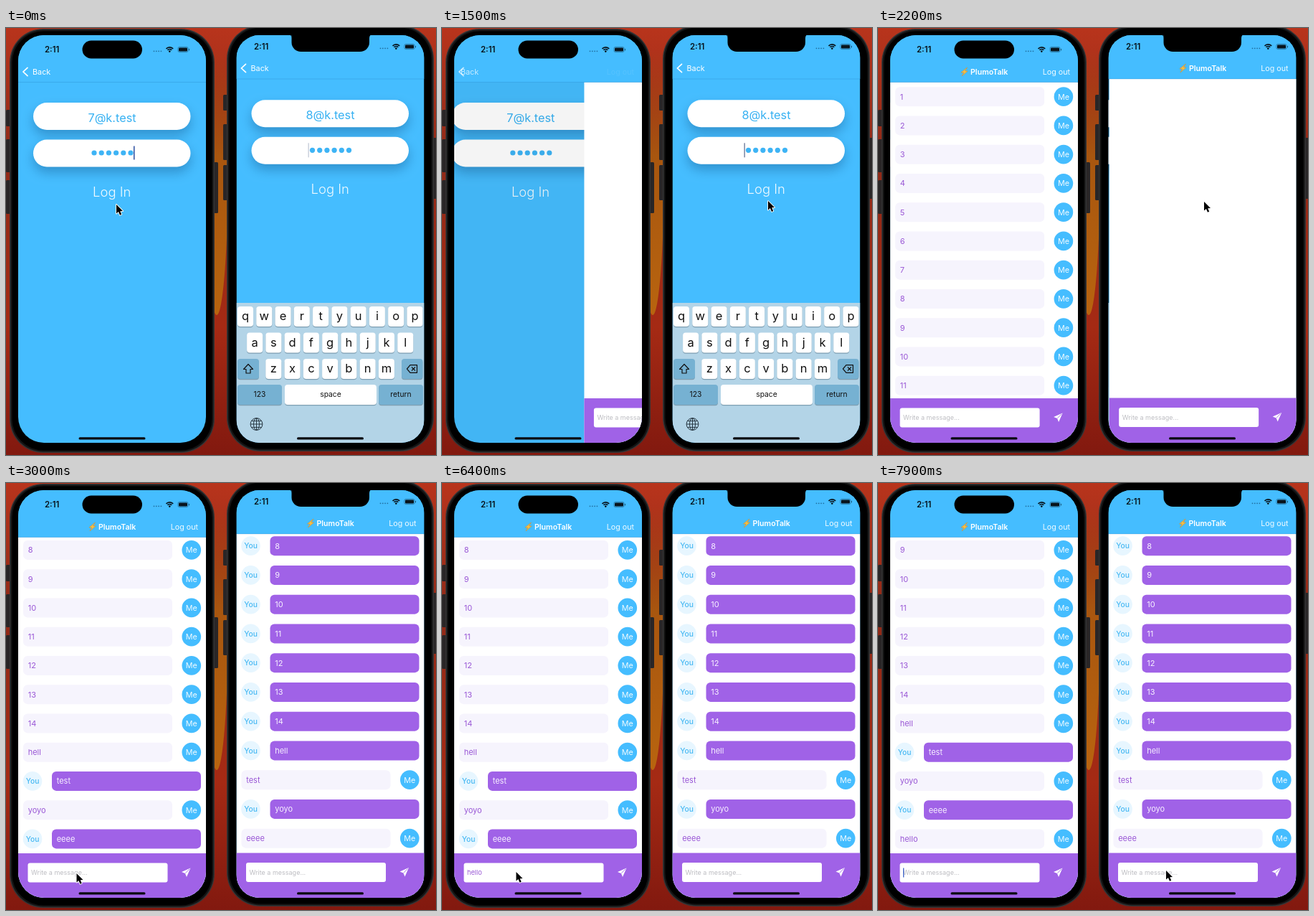
Animation of 600 by 595 pixels, one loop 8 s. Source, as an HTML page with a canvas:

```html
<!DOCTYPE html>
<html lang="en">
<head>
<meta charset="utf-8">
<title>Two phones chatting</title>
<style>
  html, body { margin: 0; width: 100%; height: 100%; overflow: hidden; background: #8c2416; }
  canvas { display: block; width: 600px; height: 595px; }
</style>
</head>
<body>
<canvas id="stage"></canvas>
<script>
const W = 600, H = 595, LOOP = 8000;
const BLUE = '#45bdff', PURPLE = '#a062e7', PALE = '#f6f4fd';
const SCREEN = { x: 17, y: 10, w: 262, h: 568 };
const SENT = 7450;
const TYPED = [5000, 5180, 5340, 5500, 5700];

const canvas = document.getElementById('stage');
const ctx = canvas.getContext('2d');
const dpr = window.devicePixelRatio || 1;
canvas.width = W * dpr;
canvas.height = H * dpr;

const messages = Array.from({ length: 14 }, (_, i) => ({ text: String(i + 1), from: 0 }));
messages.push(
  { text: 'hell', from: 0 }, { text: 'test', from: 1 }, { text: 'yoyo', from: 0 },
  { text: 'eeee', from: 1 }, { text: 'hello', from: 0 }
);

// Each phone is laid out in the left phone's coordinates, then moved by dx.
const phones = [
  {
    id: 0, dx: 0, email: '7@k.test', body: [5, 1, 286, 591], radius: 36,
    buttons: [[0, 114, 6, 23], [0, 155, 6, 46], [0, 212, 6, 47], [290, 187, 6, 71]],
    nav: 75.5, navY: 61, shift: 0, bar: 516, row: 40.25, clock: [54, 30], statusX: 0,
    push: 1415, load: 2080, scroll: 2210
  },
  {
    id: 1, dx: 304.5, email: '8@k.test', body: [3.5, -4, 289, 594], radius: 32,
    buttons: [[-1.5, 93, 6, 22], [-1.5, 134, 6, 50], [-1.5, 191, 6, 49], [291.5, 153, 6, 85]],
    nav: 71, navY: 56, shift: -3.7, bar: 515.5, row: 40.75, clock: [41.5, 26], statusX: 11.5,
    push: 1620, load: 2400, scroll: 2500
  }
];

const pointer = [
  [0, 154, 246], [450, 154, 246], [1300, 455, 241], [2350, 455, 242], [2900, 98.5, 544],
  [3300, 98.5, 544], [3800, 103.5, 542], [6500, 103.5, 542], [7000, 251, 541],
  [7500, 251, 541], [7860, 402, 540], [LOOP, 402, 540]
];

const clamp = v => Math.max(0, Math.min(1, v));
const smooth = v => { v = clamp(v); return v * v * (3 - 2 * v); };
const blink = phase => clamp(0.5 + 4 * Math.sin(2 * Math.PI * (phase + 0.02)));

function spring(ms) {
  if (ms <= 0) return 0;
  const k = ms * 0.013;
  return 1 - (1 + k) * Math.exp(-k);
}

function layer(draw, x = 0, y = 0, alpha = 1) {
  ctx.save();
  ctx.translate(x, y);
  ctx.globalAlpha *= alpha;
  draw();
  ctx.restore();
}

function rect(x, y, w, h, color) {
  ctx.fillStyle = color;
  ctx.fillRect(x, y, w, h);
}

function round(x, y, w, h, r, color) {
  ctx.beginPath();
  ctx.roundRect(x, y, w, h, r);
  ctx.fillStyle = color;
  ctx.fill();
}

function disc(x, y, r, color) {
  ctx.beginPath();
  ctx.arc(x, y, r, 0, 2 * Math.PI);
  ctx.fillStyle = color;
  ctx.fill();
}

function poly(points, closed = true) {
  ctx.beginPath();
  points.forEach(([x, y]) => ctx.lineTo(x, y));
  if (closed) ctx.closePath();
}

function stroke(color, width) {
  ctx.strokeStyle = color;
  ctx.lineWidth = width;
  ctx.stroke();
}

// y is the middle of the capitals
function text(str, x, y, size, color, weight = 400, align = 'left') {
  ctx.font = `${weight} ${size}px Inter, "Liberation Sans", sans-serif`;
  ctx.textAlign = align;
  ctx.fillStyle = color;
  ctx.fillText(str, x, y + size * 0.36);
}

function wallpaper() {
  const red = ctx.createLinearGradient(0, 0, 0, H);
  red.addColorStop(0, '#b8341c');
  red.addColorStop(0.3, '#8f2a18');
  red.addColorStop(0.7, '#a52a14');
  red.addColorStop(1, '#82190f');
  rect(0, 0, W, H, red);
  const glow = ctx.createLinearGradient(0, 30, 0, 400);
  glow.addColorStop(0, 'rgba(170,75,16,0)');
  glow.addColorStop(0.4, '#a8560f');
  glow.addColorStop(1, '#b8640f');
  ctx.beginPath();
  ctx.ellipse(294, 190, 16, 210, 0, 0, 2 * Math.PI);
  ctx.fillStyle = glow;
  ctx.fill();
}

function shell(p) {
  p.buttons.forEach(b => round(...b, 1.5, '#292627'));
  const [x, y, w, h] = p.body;
  round(x, y, w, h, 47, '#343435');
  round(x + 1.5, y + 1.5, w - 3, h - 3, 45.5, '#141414');
  round(x + 3.5, y + 3.5, w - 7, h - 7, 44, '#000');
}

function field(y) {
  ctx.save();
  ctx.shadowColor = 'rgba(10,70,120,.36)';
  ctx.shadowBlur = 16 * dpr;
  ctx.shadowOffsetY = 8 * dpr;
  round(38, y, 219.5, 38, 19, '#fff');
  ctx.restore();
}

function login(p, t) {
  field(104);
  field(155.5);
  text(p.email, 148, 125, 16.3, '#37b1f2', 400, 'center');
  for (let i = 0; i < 6; i++) disc(123 + i * 10.2, 174, 3.6, '#3eb4f5');
  if (p.id === 0) {
    layer(() => rect(178, 164.5, 1.5, 19, '#2c4fa0'), 0, 0, t < p.push - 100 ? blink(t / 1000) : 0);
  } else {
    layer(() => rect(117, 164, 1.3, 20, '#2b3f6e'), 0, 0, blink(t / 1000 + 0.488));
  }
  text('Log In', 147.7, 228, 18.4, '#f0faff', 300, 'center');
}

function key(x, y, w, label, size, color = '#fff') {
  round(x, y + 1.2, w, 28, 4, '#7f9fb2');
  round(x, y, w, 28, 4, color);
  text(label, x + w / 2, y + 13.5, size, '#111', 400, 'center');
}

function keyboard() {
  const dark = '#76b1d2';
  rect(17, 383, 262, 200, '#b3d4e7');
  [['qwertyuiop', 29.5, 388], ['asdfghjkl', 42.6, 424.5], ['zxcvbnm', 68.8, 461]]
    .forEach(([letters, x, y]) => [...letters].forEach((c, i) => key(x + i * 26.27 - 11, y, 22, c, 16.5)));
  key(18.5, 461, 30, '', 10, dark);
  key(247.5, 461, 29.5, '', 10, dark);
  key(18.5, 497, 62, '123', 10.3, dark);
  key(84.5, 497, 128, 'space', 10.3);
  key(215.5, 497, 62, 'return', 10.3, dark);

  ctx.lineJoin = 'round';
  poly([[33.5, 468.5], [40, 475.5], [36.5, 475.5], [36.5, 481], [30.5, 481], [30.5, 475.5], [27, 475.5]]);
  stroke('#111', 1.2);
  poly([[255, 475], [259.5, 469.7], [269, 469.7], [269, 480.3], [259.5, 480.3]]);
  stroke('#111', 1.2);
  poly([[261.5, 472.5], [266.5, 477.5]], false);
  stroke('#111', 1.1);
  poly([[266.5, 472.5], [261.5, 477.5]], false);
  stroke('#111', 1.1);

  for (const rx of [8.4, 4]) {
    ctx.beginPath();
    ctx.ellipse(45, 552, rx, 8.4, 0, 0, 2 * Math.PI);
    stroke('#273640', 1);
  }
  poly([[45, 543.6], [45, 560.4]], false);
  stroke('#273640', 1);
  [[-4.4, 7], [0, 8.4], [4.4, 7]].forEach(([dy, w]) => {
    poly([[45 - w, 552 + dy], [45 + w, 552 + dy]], false);
    stroke('#273640', 1);
  });
}

function message(msg, mine, y) {
  if (mine) {
    round(24, y - 13.5, 208, 27, 6, PALE);
    text(msg, 30.7, y, 11, '#9a58d6');
    disc(258.8, y, 13.3, BLUE);
    text('Me', 258.8, y, 10.8, '#f0faff', 400, 'center');
  } else {
    disc(37, y, 13.3, '#e7f6ff');
    text('You', 37, y, 10.3, '#48b9f3', 500, 'center');
    round(64, y - 13.5, 208, 27, 6, PURPLE);
    text(msg, 70.7, y, 11, '#f7f0ff');
  }
}

function list(p, t) {
  if (t < p.load) return;
  const sent = p.id === 0 && t >= SENT;
  const shown = sent ? messages : messages.slice(0, -1);
  const end = 18 * p.row - (p.bar - p.nav);
  let offset = end * smooth((t - p.scroll) / 320);
  if (sent) offset += p.row * smooth((t - SENT) / 330);
  ctx.beginPath();
  ctx.rect(17, p.nav, 262, p.bar - p.nav);
  ctx.clip();
  shown.forEach((m, i) => {
    const y = p.nav + (i + 0.5) * p.row - offset;
    if (y > p.nav - 20 && y < p.bar + 20) message(m.text, m.from === p.id, y);
  });
}

function composer(p, t) {
  rect(17, p.bar, 262, 70, PURPLE);
  const y = p.bar + 27;
  round(30.5, y - 13.5, 195, 27, 3, '#fff');
  const typed = p.id === 0 && t < SENT ? 'hello'.slice(0, TYPED.filter(k => t >= k).length) : '';
  if (typed) text(typed, 35, y, 9.2, '#9a58d6');
  else text('Write a message...', 35, y, 9, '#bdbdc2');
  if (p.id === 0 && t >= 3400) {
    const since = t >= SENT ? SENT : TYPED.reduce((a, k) => (t >= k ? k : a), 3400);
    const x = 35 + (typed ? ctx.measureText(typed).width : 0);
    layer(() => rect(x, y - 6.5, 1.3, 13, '#3f63c8'), 0, 0, blink((t - since) / 1000));
  }
  layer(() => {
    ctx.fillStyle = '#fff';
    poly([[6.5, -6.5], [-6, -1], [-1, 1]]);
    ctx.fill();
    poly([[6.5, -6.5], [1, 6], [-1, 1]]);
    ctx.fill();
    poly([[-0.6, 0.6], [5, -5]], false);
    stroke(PURPLE, 0.8);
  }, 251, y);
}

function chat(p, t) {
  rect(17, p.nav, 262, 510, '#fff');
  layer(() => list(p, t));
  composer(p, t);
}

function navBar(p, progress) {
  rect(17, 0, 262, p.nav, BLUE);
  rect(17, p.nav - 0.5, 262, 1, 'rgba(0,70,130,.16)');
  const y = p.navY;
  layer(() => {
    poly([[30, y - 5.7], [24, y], [30, y + 5.7]], false);
    ctx.lineCap = 'round';
    stroke('#fff', 1.7);
    text('Back', 37 - 36 * progress, y, 10.8, '#fff');
  }, 0, 0, clamp(1 - progress));
  layer(() => {
    poly([[4, -6], [-4.5, 1], [-0.8, 1.2], [-3.5, 6], [4.5, -1], [1, -1.2]]);
    ctx.fillStyle = '#f5c043';
    ctx.fill();
    stroke('#d98a2b', 0.6);
    text('PlumoTalk', 8.5, 0, 10.6, '#fff', 600);
  }, 120.5 + 90 * (1 - progress), y, clamp((progress - 0.35) / 0.6));
  layer(() => text('Log out', 268, y, 10.7, '#f2fbff', 400, 'right'), 0, 0, progress * progress);
}

function statusBar(p) {
  text('2:11', ...p.clock, 11.4, '#08141c', 600);
  layer(() => {
    for (let i = 0; i < 4; i++) disc(206.5 + i * 3.3, 32.3, 0.9, 'rgba(15,70,110,.65)');
    for (const r of [6.6, 4]) {
      ctx.beginPath();
      ctx.arc(228.3, 33.5, r, -Math.PI * 0.76, -Math.PI * 0.24);
      ctx.lineCap = 'butt';
      stroke('#08141c', 1.7);
    }
    disc(228.3, 32.6, 1.3, '#08141c');
    ctx.beginPath();
    ctx.roundRect(239.9, 26.4, 14.2, 7.2, 2.2);
    stroke('rgba(8,40,60,.5)', 0.8);
    round(241, 27.4, 12, 5.2, 1.3, '#08141c');
    round(255, 28.8, 1, 2.6, 0.5, 'rgba(8,40,60,.6)');
  }, p.statusX, p.clock[1] - 30);
}

function cutout(p) {
  if (p.id === 0) {
    round(106.5, 17.5, 83.5, 25, 12.5, '#000');
    return;
  }
  round(94, 0, 108.5, 33, [0, 0, 13, 13], '#000');
  ctx.fillStyle = '#000';
  for (const [x, d] of [[94, -4], [202.5, 4]]) {
    ctx.beginPath();
    ctx.moveTo(x + d, 9);
    ctx.quadraticCurveTo(x, 9.5, x, 14);
    ctx.lineTo(x, 9);
    ctx.fill();
  }
}

function screen(p, t) {
  const progress = spring(t - p.push);
  const { x, y, w, h } = SCREEN;
  ctx.beginPath();
  ctx.roundRect(x, y, w, h, p.radius);
  ctx.clip();
  rect(x, y, w, h, BLUE);
  if (progress < 0.9999) {
    layer(() => login(p, t), -0.3 * w * progress, p.shift);
    rect(x, p.nav, w, h, `rgba(0,0,0,${0.14 * progress})`);
    if (p.id === 1) layer(keyboard, -w * progress);
  }
  if (progress > 0) layer(() => chat(p, t), w * (1 - progress));
  navBar(p, progress);
  statusBar(p);
  cutout(p);
  round(101.5, 570.3, 93, 3.2, 1.6, '#0a0a10');
}

function cursor(t) {
  const i = pointer.findIndex(k => k[0] > t);
  const [t0, x0, y0] = pointer[i - 1], [t1, x1, y1] = pointer[i];
  const k = smooth((t - t0) / (t1 - t0));
  layer(() => {
    ctx.lineJoin = 'round';
    poly([[0, 0], [0, 12.6], [2.9, 10], [5, 14.8], [7.2, 13.8], [5.2, 9.2], [9, 9]]);
    stroke('#fff', 1.8);
    ctx.fillStyle = '#000';
    ctx.fill();
  }, x0 + (x1 - x0) * k, y0 + (y1 - y0) * k);
}

function frame(now) {
  const t = now % LOOP;
  ctx.setTransform(dpr, 0, 0, dpr, 0, 0);
  wallpaper();
  for (const p of phones) {
    layer(() => {
      shell(p);
      layer(() => screen(p, t));
    }, p.dx);
  }
  cursor(t);
  requestAnimationFrame(() => frame(performance.now() - start));
}

const start = performance.now();
frame(0);
</script>
</body>
</html>
```
